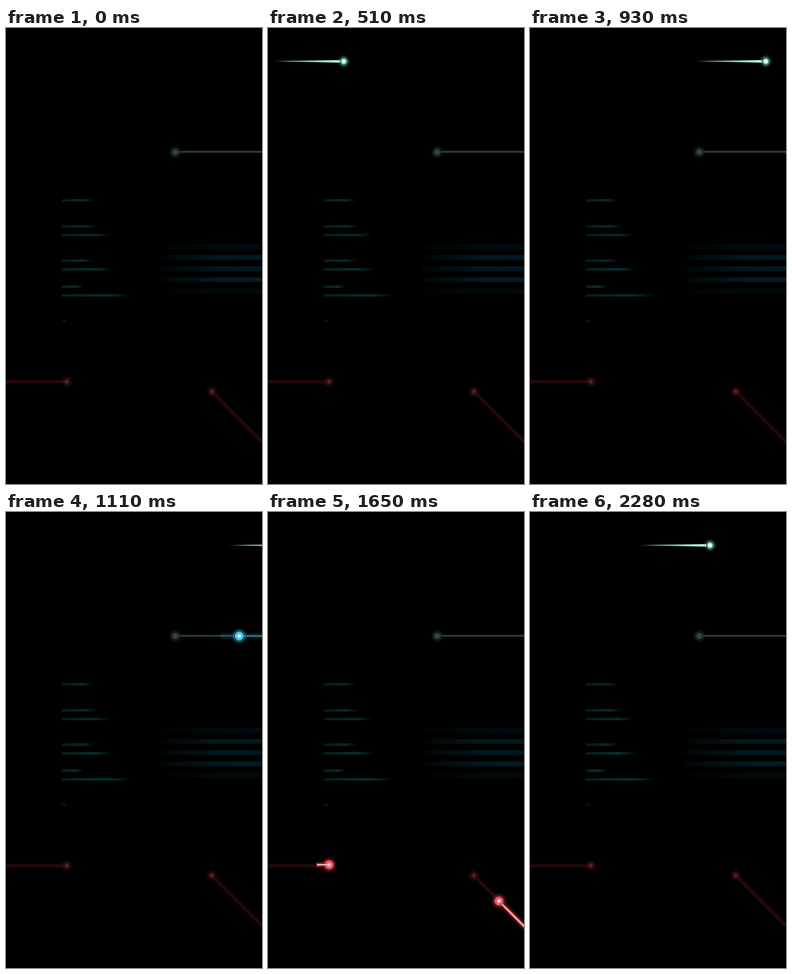
An HTML page with a canvas for the animation above (2700 ms loop, 561x998 px).

```html
<!DOCTYPE html>
<html>
<head>
<meta charset="utf-8">
<style>
html, body { margin: 0; width: 100%; height: 100%; overflow: hidden; background: #000; }
canvas { display: block; width: 561px; height: 998px; }
</style>
</head>
<body>
<canvas id="stage" width="561" height="998"></canvas>
<script>
const W = 561, H = 998, LOOP = 2700, STEP = 30;
const ctx = document.getElementById('stage').getContext('2d');
const clamp = v => Math.max(0, Math.min(1, v));
const ramp = (t, a, b) => clamp((t - a) / (b - a));
const rgba = (c, a) => `rgba(${c},${a})`;

function gradient(g, stops) {
  for (const [p, col] of stops) g.addColorStop(p, col);
  return g;
}

function disc(c, x, y, r, fill) {
  c.fillStyle = fill;
  c.beginPath();
  c.arc(x, y, r, 0, 7);
  c.fill();
}

function ring(c, x, y, r, col, w) {
  c.strokeStyle = col;
  c.lineWidth = w;
  c.beginPath();
  c.arc(x, y, r, 0, 7);
  c.stroke();
}

function halo(c, x, y, r, stops) {
  disc(c, x, y, r, gradient(c.createRadialGradient(x, y, 0, x, y, r), stops));
}

// Horizontal beam whose brightness falls off above and below its axis
function beam(c, x0, x1, y, half, stops) {
  const g = c.createLinearGradient(0, y - half, 0, y + half);
  c.fillStyle = gradient(g, stops);
  c.fillRect(x0, y - half, x1 - x0, half * 2);
}

function dataBar(c, y, end, power) {
  const x = 122, len = end - x, col = '10,84,84';
  for (let i = 0; i < 6; i++) {
    const a = power * [.45, .8, .4, .6, .85, .4][i];
    const g = c.createLinearGradient(x, 0, end, 0);
    c.fillStyle = gradient(g, [
      [0, rgba(col, a * (i < 2 ? .35 : .75))],
      [.2, rgba(col, a * .75)],
      [.65, rgba(col, a)],
      [.82, rgba(col, a * .6)],
      [1, rgba(col, 0)]
    ]);
    c.fillRect(x, y - 3 + i, len, 1);
  }
}

function streamBar(c, y, x, power) {
  for (let i = 0; i < 10; i++) {
    const edge = i === 0 || i === 9 || i === 4;
    const a = edge ? .55 + power * .4 : .16 + power * (.4 + i % 2 * .15);
    const g = c.createLinearGradient(x, 0, W, 0);
    c.fillStyle = gradient(g, [
      [0, 'rgba(3,44,58,0)'],
      [.15, rgba('3,34,42', a * .5)],
      [.6, rgba('3,42,56', a)],
      [1, rgba('3,44,60', a)]
    ]);
    c.fillRect(x, y - 5 + i, W - x, 1);
  }
}

const DIM = [[0, 'rgba(48,10,10,0)'], [.35, 'rgba(44,10,10,.75)'],
  [.5, 'rgb(50,12,12)'], [.65, 'rgba(44,10,10,.75)'], [1, 'rgba(48,10,10,0)']];

function dimEnd(c, x, y) {
  halo(c, x, y, 14, [[0, 'rgba(92,38,36,.9)'], [.3, 'rgba(72,24,23,.8)'],
    [.6, 'rgba(48,12,12,.6)'], [1, 'rgba(30,6,6,0)']]);
  c.save();
  c.translate(x, y);
  c.scale(.6, 1);
  halo(c, 0, 0, 5, [[0, 'rgba(120,80,72,.75)'], [1, 'rgba(90,40,38,0)']]);
  c.restore();
}

function backdrop() {
  const cv = document.createElement('canvas');
  cv.width = W;
  cv.height = H;
  const c = cv.getContext('2d');
  c.fillStyle = '#000';
  c.fillRect(0, 0, W, H);

  beam(c, 371, W, 271, 3.5, [[0, 'rgba(52,64,62,0)'], [.5, 'rgb(66,78,76)'], [1, 'rgba(52,64,62,0)']]);
  halo(c, 371, 271.5, 9, [[0, 'rgb(58,74,68)'], [.55, 'rgb(48,62,57)'], [.85, 'rgb(28,38,35)'], [1, 'rgba(10,16,14,0)']]);
  ring(c, 371, 271.5, 10, 'rgb(28,62,52)', 1.1);
  ring(c, 371, 271.5, 12.5, 'rgb(12,30,25)', .9);

  [[377, 193, .8], [434, 200, .8], [453, 229, .8], [509, 194, .8],
   [528, 233, .9], [566, 169, .9], [585, 275, .9], [641, 134, .4]].forEach(b => dataBar(c, ...b));
  [[478, 328, 0], [502, 334, .75], [527, 326, .65], [551, 330, .8], [576, 332, 0]].forEach(b => streamBar(c, ...b));

  beam(c, 0, 133, 774, 6, DIM);
  dimEnd(c, 133.5, 774);
  c.save();
  c.translate(451, 795.5);
  c.rotate(Math.PI / 4);
  beam(c, 0, 180, 0, 6, DIM);
  c.restore();
  dimEnd(c, 451, 795.5);
  return cv;
}

const base = backdrop();

function comet(t) {
  const x = 317.6 + 459 * Math.sin(.00187 * (t - 690)), y = 73;
  if (t < 260 || x > 715) return;
  const g = ctx.createLinearGradient(x - 152, 0, x, 0);
  ctx.fillStyle = gradient(g, [[0, 'rgba(120,190,165,.2)'], [.2, 'rgba(130,205,178,.8)'],
    [.7, 'rgb(150,225,200)'], [1, 'rgb(200,255,236)']]);
  ctx.beginPath();
  ctx.moveTo(x - 152, y - .8);
  ctx.lineTo(x, y - 3);
  ctx.lineTo(x, y + 3);
  ctx.lineTo(x - 152, y);
  ctx.fill();
  halo(ctx, x, y, 9, [[0, 'rgb(255,255,255)'], [.4, 'rgb(226,255,246)'], [.6, 'rgb(110,190,165)'],
    [.85, 'rgb(50,110,92)'], [1, 'rgba(16,50,40,.3)']]);
  ring(ctx, x, y, 9.5, 'rgba(115,200,172,.85)', 1);
  ring(ctx, x, y, 12.3, 'rgba(70,135,116,.65)', .9);
}

function bluePulse(t) {
  const x = Math.max(371, 511 - (t - 1110) * .489), y = 271.5;
  const a = 1 - ramp(t, 1430, 1590);
  if (x > 605 || !a) return;
  const tail = Math.max(x, Math.min(W, 396 + (1380 - t) * .7));
  const near = ramp(t, 1110, 1380);
  ctx.save();
  ctx.globalAlpha = a;
  const left = x - 41 * (1 - near);
  const glow = .38 * (1 - near * .5);
  beam(ctx, left, tail, y, 10, [[0, 'rgba(10,70,90,0)'], [.3, rgba('18,80,98', glow * .7)],
    [.5, rgba('40,120,135', glow)], [.7, rgba('18,80,98', glow * .7)], [1, 'rgba(10,70,90,0)']]);
  if (tail > x) beam(ctx, x, tail, y, 2.5, [[0, 'rgba(80,190,215,0)'],
    [.5, rgba('110,205,225', .35 + near * .55)], [1, 'rgba(80,190,215,0)']]);
  halo(ctx, x, y, 19, [[0, 'rgba(30,150,200,.6)'], [.6, 'rgba(16,90,130,.45)'], [1, 'rgba(6,40,60,0)']]);
  disc(ctx, x, y, 10, 'rgb(56,190,232)');
  ring(ctx, x, y, 5.5, 'rgb(105,215,245)', 1.5);
  disc(ctx, x, y, 3.6, '#fff');
  ring(ctx, x, y, 13, 'rgba(78,180,200,.85)', 1);
  ctx.restore();
}

// Drawn along +x toward the resting point at the origin
function redPulse(p, head, tail, a) {
  if (head < -190 || !a) return;
  ctx.save();
  ctx.translate(p.x, p.y);
  ctx.rotate(p.angle);
  ctx.globalAlpha = a;
  const start = Math.min(head, tail);
  if (start < head) {
    beam(ctx, start - 2, head, 0, 9, [[0, 'rgba(120,20,24,0)'], [.25, 'rgba(130,28,32,.5)'],
      [.38, 'rgb(212,66,72)'], [.62, 'rgb(212,66,72)'], [.75, 'rgba(130,28,32,.5)'], [1, 'rgba(120,20,24,0)']]);
  }
  halo(ctx, head, 0, 19, [[0, 'rgb(240,84,90)'], [.42, 'rgba(225,64,70,.9)'],
    [.65, 'rgba(130,28,32,.6)'], [1, 'rgba(60,10,12,0)']]);
  disc(ctx, head, 0, 9, 'rgb(242,96,101)');
  if (start < head) {
    ctx.fillStyle = 'rgb(255,222,220)';
    ctx.fillRect(start, -1, Math.max(0, head - start - p.gap), 2);
  }
  disc(ctx, head, 0, 3.5, p.core);
  ctx.restore();
}

const LEFT = { x: 134, y: 772, angle: 0, gap: 0, core: 'rgb(255,214,210)' };
const RIGHT = { x: 450.5, y: 796, angle: -Math.PI * .75, gap: 10, core: '#fff' };

function draw(t) {
  ctx.drawImage(base, 0, 0);
  comet(t);
  bluePulse(t);
  redPulse(LEFT, Math.min(0, -31 + (t - 1380) * .5), Math.min(0, -26 + (t - 1650) * .5),
    1 - ramp(t, 1710, 1950));
  redPulse(RIGHT, Math.min(0, -78.5 + (t - 1650) * .41), Math.min(0, -157 + (t - 1870) * .6),
    1 - ramp(t, 2110, 2270));
}

const begin = performance.now();
function tick() {
  const t = (performance.now() - begin) % LOOP;
  draw(Math.floor(t / STEP) * STEP);
  requestAnimationFrame(tick);
}
tick();
</script>
</body>
</html>
```
